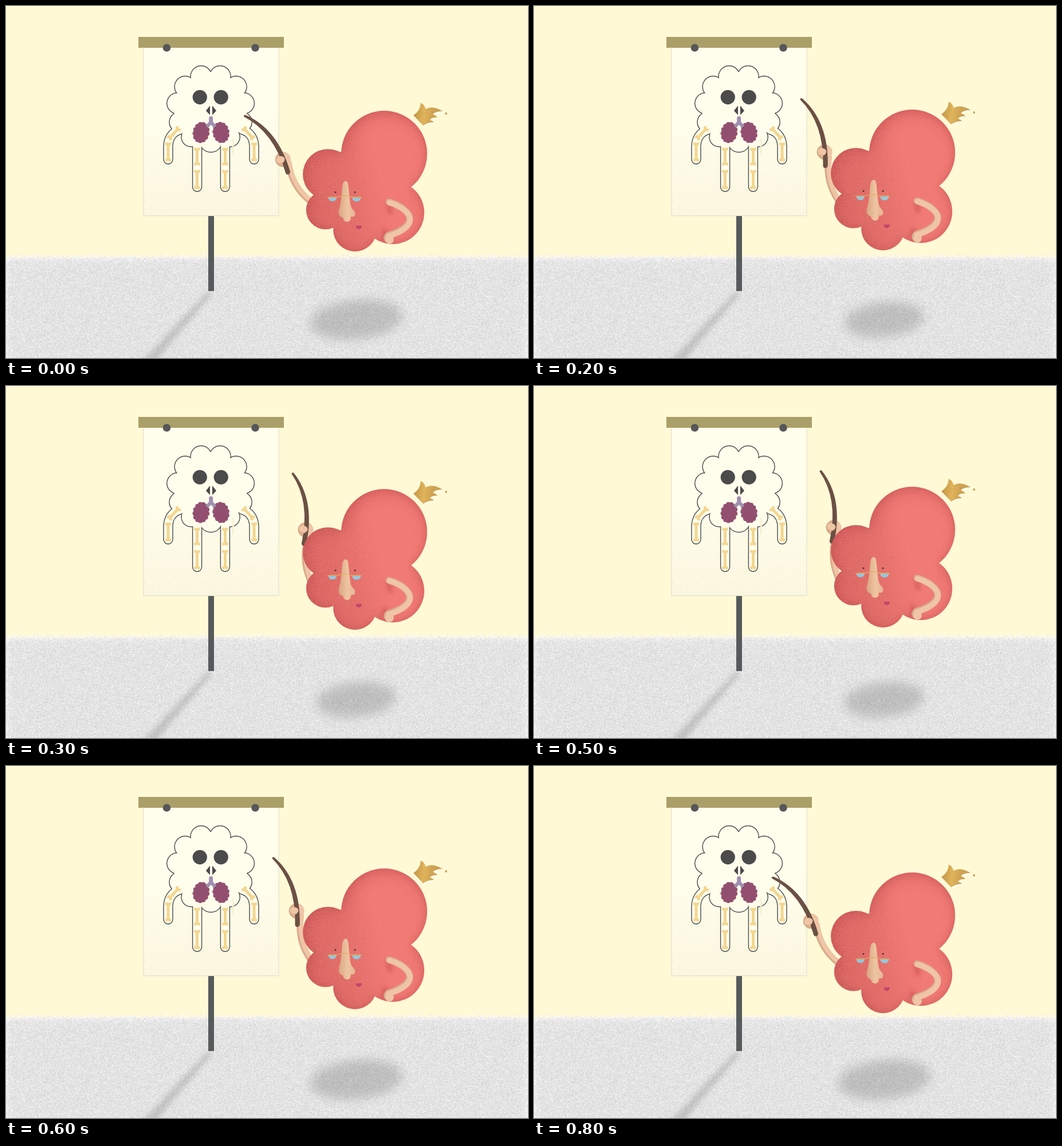
These frames come from a looping animation (911x615 px, 900 ms). An HTML page with a canvas:

```html
<!DOCTYPE html>
<html lang="en">
<head>
<meta charset="utf-8">
<title>Anatomy lesson</title>
<style>
html, body { margin: 0; width: 100%; height: 100%; overflow: hidden; background: #fff9d6; }
canvas { display: block; }
</style>
</head>
<body>
<canvas id="stage" width="911" height="615"></canvas>
<script>
const W = 911, H = 615, TAU = Math.PI * 2, STEP = 100;
const ARM_ANGLE = [0, 7.5, 17.5, 28.3, 38, 28.3, 17.5, -8, 0];
const BODY_Y = [0, -1, -2, -3, -8, -7, -4, 4, 3];
const PIVOT = { x: 530, y: 340 };
const SKIN = '#efc5a6', SKIN_DARK = '#d9ab8b', INK = '#4b4b4c', PAPER = '#fffdeb';

const stage = document.getElementById('stage').getContext('2d');

let seed = 7;
function random() {
  seed = (seed * 1664525 + 1013904223) >>> 0;
  return seed / 4294967296;
}

function layer() {
  const canvas = document.createElement('canvas');
  canvas.width = W;
  canvas.height = H;
  return canvas.getContext('2d');
}

function fill(c, color, path) {
  c.fillStyle = color;
  c.fill(new Path2D(path));
}

function line(c, color, width, path, cap = 'round') {
  c.strokeStyle = color;
  c.lineWidth = width;
  c.lineCap = cap;
  c.lineJoin = 'round';
  c.stroke(new Path2D(path));
}

function ellipse(c, color, x, y, rx, ry = rx, tilt = 0) {
  c.fillStyle = color;
  c.beginPath();
  c.ellipse(x, y, rx, ry, tilt, 0, TAU);
  c.fill();
}

function rect(c, color, x, y, w, h) {
  c.fillStyle = color;
  c.fillRect(x, y, w, h);
}

function gradient(c, x0, y0, x1, y1, ...colors) {
  const g = c.createLinearGradient(x0, y0, x1, y1);
  colors.forEach((color, i) => g.addColorStop(i / (colors.length - 1), color));
  return g;
}

// Adds brightness noise; strength(x, y) gives its amplitude.
function grain(c, x, y, w, h, strength) {
  const image = c.getImageData(x, y, w, h), d = image.data;
  for (let i = 0; i < d.length; i += 4) {
    if (!d[i + 3]) continue;
    const p = i / 4;
    const delta = (random() - 0.5) * strength(x + p % w, y + Math.floor(p / w));
    for (let k = 0; k < 3; k++) d[i + k] += delta;
  }
  c.putImageData(image, x, y);
}

function drawFloor(c) {
  const top = 428, image = c.getImageData(0, top, W, H - top), d = image.data;
  for (let y = top; y < H; y++) {
    for (let x = 0; x < W; x++) {
      if (y < 437 + (random() + random() - 1) * 7) continue;
      const side = Math.min(x, W - 1 - x), back = Math.max(0, y - 437);
      const v = 227 + (random() - 0.5) * 36 + 18 * Math.exp(-back / 6) + 12 * Math.exp(-side / 5);
      const i = ((y - top) * W + x) * 4;
      d[i] = v + 1;
      d[i + 1] = v;
      d[i + 2] = v;
    }
  }
  c.putImageData(image, 0, top);
  c.filter = 'blur(4px)';
  fill(c, 'rgba(0,0,0,.14)', 'M351 500H362L262 620H238Z');
  c.filter = 'none';
}

function bone(c, x0, y0, x1, y1) {
  const color = '#f3d68f', a = Math.atan2(y1 - y0, x1 - x0);
  const sx = -Math.sin(a) * 2.6, sy = Math.cos(a) * 2.6;
  line(c, color, 5, `M${x0} ${y0}L${x1} ${y1}`, 'butt');
  for (const [x, y] of [[x0, y0], [x1, y1]]) {
    ellipse(c, color, x + sx, y + sy, 2.7);
    ellipse(c, color, x - sx, y - sy, 2.7);
  }
}

function mirrored(c, axis, draw) {
  draw();
  c.save();
  c.translate(axis * 2, 0);
  c.scale(-1, 1);
  draw();
  c.restore();
}

function sheepShape(c, color, grow) {
  const bumps = [[340.5, 123, 18.5], [312.6, 141, 18.5], [299, 170, 18.2], [303, 203, 18], [323, 229, 17]];
  mirrored(c, 357.1, () => bumps.forEach(([x, y, r]) => ellipse(c, color, x, y, r + grow)));
  mirrored(c, 358, () => {
    line(c, color, 16 + grow * 2, 'M283 268V246C283 232 290 220 304 216');
    line(c, color, 16 + grow * 2, 'M333.6 240V316');
  });
  ellipse(c, color, 357.5, 238, 19 + grow, 17.5 + grow);
}

function lung(c, x, tilt) {
  const color = '#924f70';
  ellipse(c, color, x, 221, 11.5, 15, tilt);
  for (let i = 0; i < 13; i++) {
    const a = i / 13 * TAU, u = 10.8 * Math.cos(a), v = 14.7 * Math.sin(a);
    ellipse(c, color, x + u * Math.cos(tilt) - v * Math.sin(tilt),
      221 + u * Math.sin(tilt) + v * Math.cos(tilt), 4);
  }
}

function drawChart(c) {
  rect(c, '#dcdcd2', 239.5, 73, 237, 294);
  rect(c, gradient(c, 0, 73, 0, 366, PAPER, PAPER, '#fbf6df'), 240.5, 73, 235, 293);
  grain(c, 241, 74, 234, 291, (x, y) => Math.max(0, y - 160) / 22);
  rect(c, '#565a5a', 353, 367, 10, 131);
  rect(c, '#ab9f69', 231, 54, 254, 19);
  ellipse(c, '#555759', 280.5, 73, 6.8);
  ellipse(c, '#555759', 435, 73, 6.8);

  sheepShape(c, INK, 0.7);
  sheepShape(c, PAPER, -0.7);
  fill(c, PAPER, 'M357 115L400 130L422 170L418 205L400 228L378 240H338L316 228L296 205L292 170L316 130Z');

  rect(c, '#f6f0d2', 395, 231, 2.5, 28);
  mirrored(c, 358, () => {
    bone(c, 300.5, 214.5, 285.5, 230.5);
    bone(c, 283, 241, 283, 269);
    bone(c, 333.5, 250, 333.5, 276);
    bone(c, 333.5, 289, 333.5, 317.5);
  });
  ellipse(c, INK, 338.3, 159.3, 12.6);
  ellipse(c, INK, 375.2, 159.3, 12.6);
  fill(c, INK, 'M349 183L356 174V190.5ZM367 183L360 174V190.5Z');
  lung(c, 340.5, 0.18);
  lung(c, 375.2, -0.18);
  line(c, '#9f90b0', 7, 'M357.7 196V204', 'round');
  line(c, '#9f90b0', 6, 'M357.7 203L350.5 211M357.7 203L365 211', 'butt');
}

function bodyShape(c, color) {
  const lobes = [[660, 258, 75], [562, 294, 44], [557.5, 356.5, 33.7], [609, 391, 38], [675, 361, 55]];
  lobes.forEach(([x, y, r]) => ellipse(c, color, x, y, r));
  fill(c, color, 'M560 270L640 220L700 310L660 390L600 400L555 360Z');
}

function drawCrown(c) {
  const crown = 'M711 191Q723 183 724 169Q732 174 732 180Q745 173 762 184Q750 184 745 189' +
    'Q750 191 753 195Q744 194 740 199Q744 200 747 203Q736 203 728 209Z';
  c.save();
  c.translate(1, 2);
  fill(c, '#fffefa', crown);
  c.restore();
  fill(c, gradient(c, 714, 188, 745, 192, '#c79a49', '#e0b35c', '#cda251'), crown);
  ellipse(c, '#cda251', 768, 188, 1.9);
}

function drawFace(c) {
  ellipse(c, '#3b2a2a', 575, 325.3, 1.4);
  ellipse(c, '#3b2a2a', 609, 325.3, 1.4);
  fill(c, gradient(c, 582, 0, 610, 0, '#d9a985', '#efc4a2', '#e5b592'),
    'M592.5 305.5Q597 306 597.5 314L600 338Q601 351 605 355.5Q611 360 609 366Q607 369 602 368' +
    'Q602 377 595 377Q589 377 588 370Q581 368 580.5 361Q581 353 583.5 347Q586 332 586.5 317Q588 306 592.5 305.5Z');
  fill(c, '#93c8dc', 'M562.5 335H577A7.3 7.2 0 0 1 562.5 335ZM604 335H619.5A7.8 7.4 0 0 1 604 335Z');
  line(c, '#e2b05f', 1.3, 'M561.5 334H577Q591 329 604 334H620.5');
  fill(c, '#c14868', 'M610 386Q612 382.5 615.5 384Q619 382 621.5 385Q619 390 615 390Q612 389 610 386Z');
}

function drawRestingArm(c) {
  const arm = 'M668.5 342.5C690 349 704.5 361 704.5 372C704 384 690 394 667 401';
  c.filter = 'blur(3px)';
  line(c, 'rgba(190,70,75,.45)', 9, 'M667 347Q670 353 670 360M661 394L660 405');
  c.filter = 'none';
  line(c, SKIN_DARK, 12, arm);
  ellipse(c, SKIN_DARK, 667, 405, 8);
  c.save();
  c.translate(0.8, 1);
  line(c, SKIN, 9.5, arm);
  ellipse(c, SKIN, 668.5, 407, 7.5);
  c.restore();
}

function makeBody() {
  const c = layer(), rim = layer();
  bodyShape(c, '#f27a74');
  c.globalCompositeOperation = 'source-atop';
  rect(c, gradient(c, 518, 330, 655, 295, '#dc6864', '#e36f6a', '#f27a74'), 500, 150, 260, 300);

  // Soft dark rim, heavier at the upper left: the blurred outside laid over the shape.
  rect(rim, '#c24f50', 460, 130, 340, 360);
  rim.globalCompositeOperation = 'destination-out';
  bodyShape(rim, '#000');
  c.globalAlpha = 0.5;
  c.filter = 'blur(7px)';
  c.drawImage(rim.canvas, 0, 0);
  c.filter = 'blur(14px)';
  c.drawImage(rim.canvas, 5, 7);
  c.filter = 'none';
  c.globalAlpha = 1;
  grain(c, 510, 175, 230, 260, x => 6 + 14 * Math.max(0, (660 - x) / 150));
  c.globalCompositeOperation = 'source-over';

  drawFace(c);
  drawRestingArm(c);
  drawCrown(c);
  return c.canvas;
}

function drawPointingArm(c, degrees) {
  const arm = 'M493 274Q498 315 532 342';
  c.save();
  c.translate(PIVOT.x, PIVOT.y);
  c.rotate(degrees * Math.PI / 180);
  c.translate(-PIVOT.x, -PIVOT.y);
  line(c, SKIN_DARK, 11, arm);
  ellipse(c, SKIN_DARK, 483, 268, 13.2);
  c.save();
  c.translate(1.5, -0.5);
  line(c, SKIN, 7.5, arm);
  ellipse(c, SKIN, 484, 267.5, 11.2);
  c.restore();
  fill(c, '#6b5044', 'M415 193.2Q414.5 189.5 418.5 190.5Q474 215 496 289.5Q495.5 294.5 491.5 294.5Q488 294 487.5 290Q467 220 415 193.2Z');
  ellipse(c, SKIN_DARK, 478, 270, 8, 6.6, -0.3);
  ellipse(c, SKIN, 479, 268.5, 7.5, 6, -0.3);
  c.restore();
}

function makeBackdrop(rx, ry) {
  const c = layer();
  c.drawImage(scene, 0, 0);
  c.filter = 'blur(9px)';
  ellipse(c, 'rgba(0,0,0,.16)', 611, 548, rx, ry, -0.1);
  return c.canvas;
}

function makeScene() {
  const c = layer();
  rect(c, '#fff9d6', 0, 0, W, H);
  drawFloor(c);
  drawChart(c);
  return c.canvas;
}

const scene = makeScene();
const wideShadow = makeBackdrop(81, 34);
const smallShadow = makeBackdrop(70, 30);
const body = makeBody();

function render() {
  const pose = Math.floor(performance.now() / STEP) % ARM_ANGLE.length;
  stage.drawImage(pose >= 1 && pose <= 5 ? smallShadow : wideShadow, 0, 0);
  stage.save();
  stage.translate(0, BODY_Y[pose]);
  drawPointingArm(stage, ARM_ANGLE[pose]);
  stage.drawImage(body, 0, 0);
  stage.restore();
  requestAnimationFrame(render);
}
render();
</script>
</body>
</html>
```
